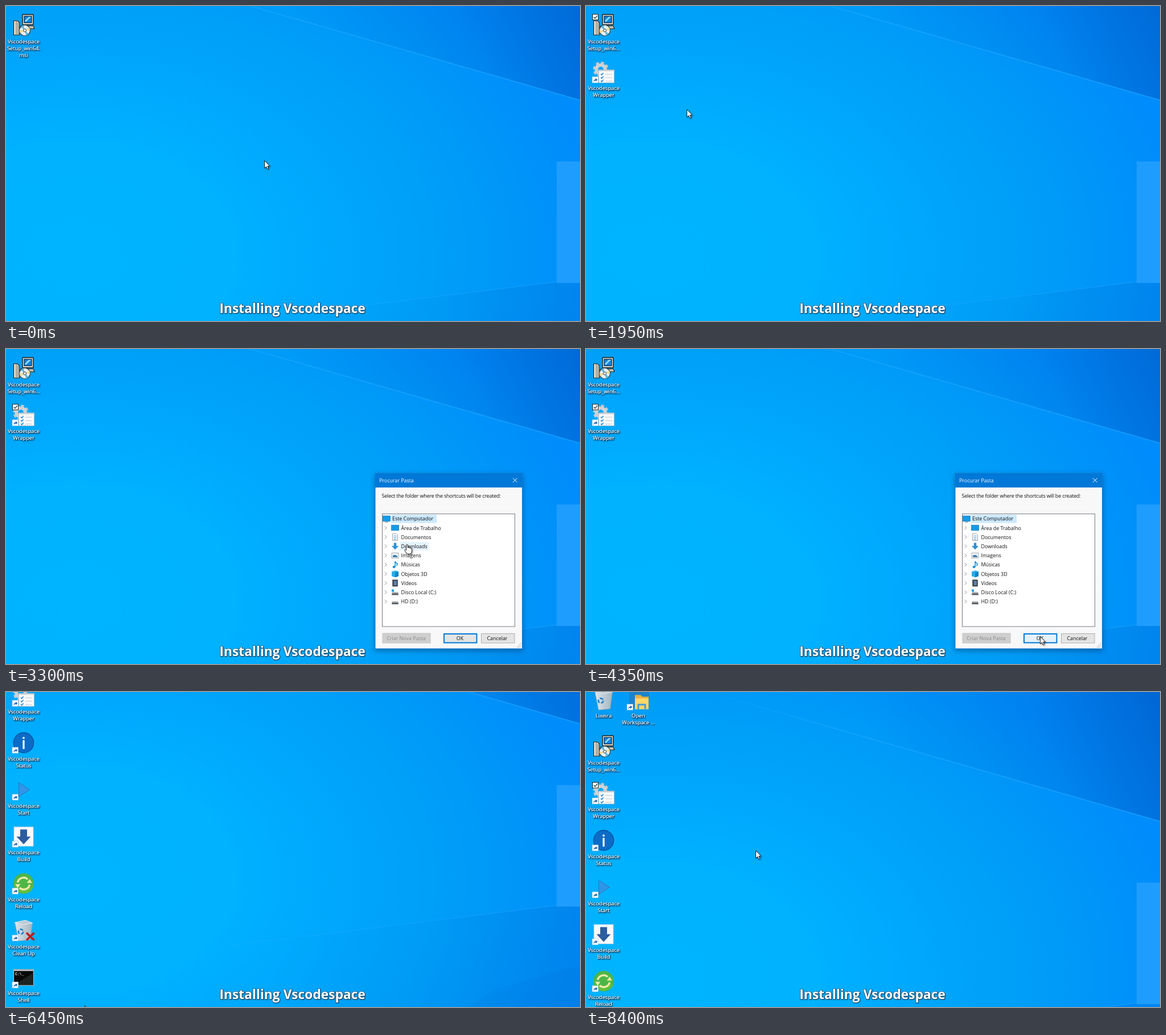
Animation of 1009x555 px, one loop 8550 ms. Source, as an HTML page:

```html
<!DOCTYPE html>
<html lang="en">
<head>
<meta charset="utf-8">
<title>Installing Vscodespace</title>
<style>
  html, body { margin: 0; width: 100%; height: 100%; overflow: hidden; background: #00a5fa; }
  svg { display: block; width: 1009px; height: 555px; }
  text { font-family: "Open Sans", "Noto Sans", sans-serif; }
  .label { font-size: 9.4px; fill: #fff; text-anchor: middle; filter: url(#labelShadow); }
  .caption { font-size: 22.8px; font-weight: 700; fill: #fff; text-anchor: middle;
    stroke: #2b5878; stroke-width: 1.6px; stroke-linejoin: round; paint-order: stroke; filter: url(#captionShadow); }
  #dialog text { font-size: 8.9px; fill: #111; }
  #dialog .mid { text-anchor: middle; }
  #dialog .light { fill: #fff; }
  #dialog .off { fill: #8b8b8b; }
  #dialog .prompt { font-size: 9px; letter-spacing: -.2px; }
</style>
</head>
<body>
<svg viewBox="0 0 1009 555" xmlns="http://www.w3.org/2000/svg">
  <defs>
    <radialGradient id="sky" gradientUnits="userSpaceOnUse" cx="0" cy="0" r="800"
        gradientTransform="translate(120 440) scale(1.4 1)">
      <stop offset="0" stop-color="#00b4ff"/>
      <stop offset=".25" stop-color="#00b2ff"/>
      <stop offset=".33" stop-color="#00acfe"/>
      <stop offset=".44" stop-color="#00a6fb"/>
      <stop offset=".55" stop-color="#00a0f8"/>
      <stop offset=".68" stop-color="#0097f8"/>
      <stop offset=".82" stop-color="#008dfb"/>
      <stop offset="1" stop-color="#008aff"/>
    </radialGradient>
    <linearGradient id="upper" gradientUnits="userSpaceOnUse" x1="560" y1="160" x2="1009" y2="-30">
      <stop offset="0" stop-color="#0050b8" stop-opacity="0"/>
      <stop offset=".55" stop-color="#0050b8" stop-opacity=".16"/>
      <stop offset="1" stop-color="#0050b8" stop-opacity=".58"/>
    </linearGradient>
    <linearGradient id="lower" gradientUnits="userSpaceOnUse" x1="480" y1="520" x2="1009" y2="660">
      <stop offset="0" stop-color="#0060c0" stop-opacity="0"/>
      <stop offset=".5" stop-color="#0060c0" stop-opacity=".06"/>
      <stop offset="1" stop-color="#0060c0" stop-opacity=".24"/>
    </linearGradient>
    <linearGradient id="beam" gradientUnits="userSpaceOnUse" x1="200" y1="0" x2="1009" y2="0">
      <stop offset="0" stop-color="#2bb4ff" stop-opacity="0"/>
      <stop offset=".4" stop-color="#22acff" stop-opacity=".55"/>
      <stop offset="1" stop-color="#1ba4ff" stop-opacity=".75"/>
    </linearGradient>
    <linearGradient id="bin" x1="0" y1="0" x2="1" y2="0">
      <stop offset="0" stop-color="#dfe6eb"/>
      <stop offset="1" stop-color="#a3b5c1"/>
    </linearGradient>
    <filter id="labelShadow" x="-20%" y="-30%" width="140%" height="180%">
      <feDropShadow dx=".6" dy=".8" stdDeviation=".5" flood-color="#001020"/>
      <feDropShadow dx=".4" dy=".6" stdDeviation="1" flood-color="#001020" flood-opacity=".8"/>
    </filter>
    <filter id="captionShadow" x="-10%" y="-30%" width="120%" height="180%">
      <feDropShadow dx=".6" dy=".8" stdDeviation=".7" flood-color="#00203c" flood-opacity=".7"/>
    </filter>
    <filter id="windowShadow" x="-10%" y="-10%" width="120%" height="120%">
      <feDropShadow dx="0" dy="3" stdDeviation="4" flood-color="#002c55" flood-opacity=".5"/>
    </filter>
    <filter id="pointerShadow" x="-30%" y="-30%" width="190%" height="180%">
      <feDropShadow dx="1.5" dy="1.5" stdDeviation="1" flood-opacity=".4"/>
    </filter>

    <g id="link">
      <rect x="-20" y="8" width="10.5" height="10.5" fill="#fff" stroke="#9fc3dc" stroke-width=".6"/>
      <path d="M-17.5 17C-17.5 13.5-16 12.5-14 12.5V10.3L-10.8 13.3L-14 16.2V14.3Q-16 14.2-17.5 17Z" fill="#1d62ad"/>
    </g>
    <g id="check">
      <rect x="-19.5" y="-19.5" width="10" height="10" fill="#fff" stroke="#222"/>
      <path d="M-17.3-14.5l2.2 2.4 4-5" fill="none" stroke="#222" stroke-width="1.2"/>
    </g>
    <g id="recycle" fill="none" stroke="#1880d0" stroke-width="2.6">
      <circle r="4.2" stroke-dasharray="6 2.8"/>
    </g>

    <g id="setup">
      <path d="M-17.5-8h6l4 3v22h-10z" fill="#e6e3d6" stroke="#24231f" stroke-width="1.2"/>
      <path d="M-13-7v23M-10-5v21" stroke="#6d6a5f" stroke-width="1.2"/>
      <rect x="-2" y="-19" width="19" height="18" rx="1" fill="#e4e1d3" stroke="#191815" stroke-width="1.4"/>
      <rect x="1" y="-16" width="13" height="11.5" fill="#1583dc" stroke="#0a2f57" stroke-width="1.3"/>
      <path d="M2-8l7-7h4l-9 9z" fill="#8fdcff"/>
      <path d="M-5 1h22l2 5H-7z" fill="#c9c5b6" stroke="#24231f" stroke-width="1.2"/>
      <circle cx="2" cy="9" r="9.5" fill="#e6eff3" stroke="#333d44" stroke-width="1.2"/>
      <path d="M2 9L-5 3a9 9 0 0 1 5-3zM2 9l7 6a9 9 0 0 1-5 3z" fill="#5fb9e0"/>
      <path d="M2 9l8-5a9 9 0 0 1 1 5zM2 9l-8 5a9 9 0 0 1-1-5z" fill="#f3d98e"/>
      <circle cx="2" cy="9" r="2.6" fill="#fff" stroke="#333d44"/>
    </g>
    <g id="wrapper">
      <circle cx="-5" cy="-5" r="11" fill="none" stroke="#c3c8cc" stroke-width="5.5" stroke-dasharray="5 3.64"/>
      <circle cx="-5" cy="-5" r="7.8" fill="none" stroke="#ced2d5" stroke-width="6"/>
      <rect x="-8.5" y="-4" width="27" height="22.5" fill="#f8f9fa" stroke="#a9b4bb" stroke-width=".8"/>
      <path d="M-8.5-3h27" stroke="#c9d0d5" stroke-width="2"/>
      <path d="M-5 3l1.6 1.6 3-3.4M-5 9l1.6 1.6 3-3.4M-5 15l1.6 1.6 3-3.4" fill="none" stroke="#2087d8" stroke-width="1.5"/>
      <path d="M3 3.5h12M3 9.5h12M3 15.5h12" stroke="#c3cad0"/>
    </g>
    <g id="status">
      <circle r="17.7" fill="#0b6cc8" stroke="#0a4c94" stroke-width="1.2"/>
      <circle cy="-8.5" r="1.9" fill="#fff"/>
      <path d="M0-4.5V11" stroke="#fff" stroke-width="3.2"/>
    </g>
    <g id="start"><path d="M-8.5-12.5V12.5L10.5 0Z" fill="#2f95e6" stroke="#2a78c2"/></g>
    <g id="build">
      <rect x="-17" y="-17" width="34" height="34" fill="#f7f9fc" stroke="#c4d5e4" stroke-width=".7"/>
      <path d="M-6-12.5H6V0H12.5L0 13.5L-12.5 0H-6Z" fill="#2c5d9f"/>
    </g>
    <g id="reload">
      <circle r="18" fill="#4db746"/>
      <path d="M-17 5A18 18 0 0 0 17 5Q0 12-17 5Z" fill="#62c03c"/>
      <path d="M-10.5-2A10.500 10.500 0 0 1 7-7.500M10.500 2A10.500 10.500 0 0 1-7 7.500" fill="none" stroke="#eee9a8" stroke-width="3.6"/>
      <path d="M5.500-1h9.500l-4.500-7zM-5.500 1h-9.500l4.500 7z" fill="#eee9a8"/>
    </g>
    <g id="trash">
      <path d="M-15.5-14L3-18 15.5-13 11.5 16.5-9 18.5Z" fill="url(#bin)" stroke="#7f9bac" stroke-width=".8"/>
      <path d="M-15.5-14L3-18 15.5-13 0-10.5Z" fill="#bccbd4" stroke="#eef3f6" stroke-width=".9"/>
      <path d="M0-10.5L2 17" stroke="#b4c4ce"/>
      <use href="#recycle" x="-5" y="2"/>
    </g>
    <g id="clean">
      <use href="#trash"/>
      <path d="M5 4L18.5 17M18.5 4L5 17" stroke="#c31c1c" stroke-width="3.6"/>
    </g>
    <g id="shell">
      <rect x="-17.5" y="-14" width="35" height="28" fill="#080808" stroke="#aeb5b9" stroke-width="1.3"/>
      <path d="M-16.8-12.4h33.6" stroke="#d9dde0" stroke-width="1.8"/>
      <path d="M-16.8 13.3L16.8-8V13.3Z" fill="#1d2422"/>
      <text x="-15" y="-4" font-size="6.5" fill="#eee" style="font-family:'Liberation Mono',monospace;font-weight:700">C:\_</text>
    </g>
    <g id="stop">
      <circle r="17.5" fill="#c4151b" stroke="#8f1116" stroke-width="1.2"/>
      <rect x="-8" y="-10" width="16" height="18" fill="#fff"/>
    </g>
    <g id="open">
      <rect x="-16" y="-17" width="35" height="32" fill="#1b83cc"/>
      <path d="M-6-8H4l3 3H18V17H-6Z" fill="#e9b13b"/>
      <path d="M-6-2H18V17H-6Z" fill="#ffd767"/>
      <path d="M0 17V9H12V17" fill="none" stroke="#4a9bd2" stroke-width="3"/>
    </g>
  </defs>

  <g id="world">
    <rect y="-90" width="1009" height="830" fill="url(#sky)"/>
    <path d="M116-90L1009 166V-90Z" fill="url(#upper)"/>
    <path d="M116-90L1009 166" stroke="url(#beam)" stroke-width="1.8"/>
    <path d="M400 556L968 486H1009V740H400Z" fill="url(#lower)"/>
    <path d="M860 634L1009 592V740H700Z" fill="#0060c0" opacity=".08"/>
    <path d="M400 556L968 486" stroke="url(#beam)" stroke-width="1.3" opacity=".7"/>
    <rect x="968" y="274" width="214" height="214" fill="#1f9dff"/>
    <g id="icons"></g>
  </g>

  <g id="dialog">
    <rect x="649" y="219" width="258.5" height="309" fill="#f8f8f8" stroke="#1b7fd0" filter="url(#windowShadow)"/>
    <rect x="649" y="219" width="258.5" height="25" fill="#0078d7"/>
    <text class="light" x="656" y="234.5">Procurar Pasta</text>
    <path d="M891 227.5l7.5 7.5m0-7.5l-7.5 7.5" stroke="#fff"/>
    <text class="prompt" x="660.5" y="261.5">Select the folder where the shortcuts will be created:</text>
    <rect x="661.5" y="290.5" width="233" height="198.5" fill="#fff" stroke="#777c84"/>
    <rect x="677" y="292" width="80" height="14.5" fill="#cce8ff"/>
    <rect id="hover" x="693" height="15" fill="#e5f3ff"/>
    <g id="tree"></g>
    <rect x="662" y="501" width="84" height="17" fill="#cfcfcf" stroke="#c2c2c2"/>
    <text class="mid off" x="703.5" y="513">Criar Nova Pasta</text>
    <rect id="ok" x="770" y="502" width="57.5" height="15.5" stroke="#0078d7" stroke-width="2"/>
    <text class="mid" x="798" y="513">OK</text>
    <rect x="835.5" y="501.5" width="58.5" height="16.5" fill="#e4e4e4" stroke="#adadad"/>
    <text class="mid" x="863.5" y="513">Cancelar</text>
    <path d="M898 525h7M901 522h4M903.5 519h1.5" stroke="#b0b0b0" stroke-width="1.7" stroke-dasharray="1.7 1.3"/>
  </g>

  <text class="caption" x="503.5" y="541">Installing Vscodespace</text>

  <g id="pointer" filter="url(#pointerShadow)">
    <path id="arrow" d="M.5.5V13.7L3.500 11 5.500 15.500 7.600 14.600 5.700 10.200H9.700Z" fill="#fff" stroke="#111" stroke-width=".9"/>
    <path id="hand" d="M-1.3 1.3Q0-.8 1.3 1.3V6Q3 4.800 4 6.500 5.500 5.500 6.300 7 8.500 6.500 8.500 9 8.800 14 6.500 17H-.5Q-2 13.500-4.500 10.500-4 8-1.300 10.500Z" fill="#fff" stroke="#111" stroke-width=".9"/>
  </g>
</svg>
<script>
const LOOP = 8550, STEP = 150, PITCH = 82.7;
const $ = id => document.getElementById(id);
const show = (el, on) => { el.style.display = on ? '' : 'none'; };

// name, column, row, label lines, time it appears, shortcut badge
const ITEMS = [
  ['trash', 0, -1, ['Lixeira'], 0, 0],
  ['setup', 0, 0, ['Vscodespace', 'Setup_win6...'], 0, 0],
  ['wrapper', 0, 1, ['Vscodespace', 'Wrapper'], 1650, 1],
  ['status', 0, 2, ['Vscodespace', 'Status'], 5100, 1],
  ['start', 0, 3, ['Vscodespace', 'Start'], 5400, 1],
  ['build', 0, 4, ['Vscodespace', 'Build'], 5550, 1],
  ['reload', 0, 5, ['Vscodespace', 'Reload'], 5700, 1],
  ['clean', 0, 6, ['Vscodespace', 'Clean Up'], 5850, 1],
  ['shell', 0, 7, ['Vscodespace', 'Shell'], 6000, 1],
  ['stop', 0, 8, [], 6150, 1],
  ['open', 1, -1, ['Open', 'Workspace ...'], 6300, 1]
];

const lines = (list, id) => `<g class="label" id="${id}">` +
  list.map((s, i) => `<text y="${31.5 + 12 * i}">${s}</text>`).join('') + '</g>';

$('icons').innerHTML = ITEMS.map(([name, col, row, label, , badge]) =>
  `<g id="item-${name}" transform="translate(${31 + 61 * col} ${34 + PITCH * row})">` +
  `<use href="#${name}"/>${badge ? '<use href="#link"/>' : ''}${lines(label, 'label-' + name)}` +
  (name === 'setup' ? lines(['Vscodespace', 'Setup_win64.', 'msi'], 'label-full') : '') +
  `<use href="#check" id="check-${name}"/></g>`).join('');

const FOLDERS = ['Este Computador', 'Área de Trabalho', 'Documentos', 'Downloads', 'Imagens',
  'Músicas', 'Objetos 3D', 'Vídeos', 'Disco Local (C:)', 'HD (D:)'];
const screenIcon = '<rect x="-6.5" y="-5" width="13" height="9.5" fill="#159be8" stroke="#1473ad" stroke-width=".7"/>';
const drive = '<path d="M-5 0H5L6 5H-6Z" fill="#555b60"/><path d="M-5 0H5L6 2H-6Z" fill="#b9bec2"/>';
const GLYPHS = [
  screenIcon + '<path d="M-3 6H3" stroke="#55707f"/>',
  screenIcon,
  '<path d="M-4.5-6H2L4.5-3.5V6H-4.5Z" fill="#fff" stroke="#7f8b94" stroke-width=".8"/><path d="M-2.5-2H2.5M-2.5 1H2.5M-2.5 4H2.5" stroke="#3b93cc"/>',
  '<path d="M-2.2-6H2.2V-.5H6L0 6-6-.5H-2.2Z" fill="#2d8fd8"/>',
  '<rect x="-6" y="-4.5" width="12" height="9" fill="#f4f7f9" stroke="#88949c" stroke-width=".8"/><path d="M-4 3V0L0-1 4 1V3Z" fill="#3276a8"/>',
  '<path d="M0-6V4M0-6Q1-3 4-1.5Q3.5 1 2.5 2" fill="none" stroke="#118fdd" stroke-width="1.6"/><ellipse cx="-2" cy="4" rx="2.5" ry="2" fill="#118fdd"/>',
  '<path d="M-6-4L1-6 6-4V4L0 6-6 4Z" fill="#27aee8"/><path d="M-6-4L0-2 6-4V4L0 6V-2Z" fill="#1384c4"/>',
  '<rect x="-5" y="-6" width="10" height="12" fill="#333b43"/><path d="M-4-6V6M4-6V6" stroke="#c7ced3" stroke-dasharray="1.3 1.3"/><rect x="-2" y="-4" width="4.5" height="8" fill="#5f88b4"/>',
  drive + '<rect x="-6" y="-5" width="4" height="4" fill="#1a9be8"/>',
  drive
];
$('tree').innerHTML = FOLDERS.map((name, i) => {
  const y = 299 + 16.2 * i;
  return `<g transform="translate(${i ? 684 : 669} ${y})">${GLYPHS[i]}</g>` +
    (i ? `<path d="M666 ${y - 3}l3 3-3 3" fill="none" stroke="#888"/>` : '') +
    `<text x="${i ? 694.5 : 679}" y="${y + 3.3}">${name}</text>`;
}).join('');

// time, x, y
const POINTER = [
  [0, 454, 272], [150, 420, 250], [300, 290, 165], [450, 120, 75], [600, 38, 38], [1350, 38, 38],
  [1650, 115, 115], [1950, 177, 182], [2100, 110, 150], [2250, 40, 120], [2850, 40, 120],
  [3000, 270, 200], [3150, 552, 293], [3300, 705, 344], [3600, 716, 395], [3900, 780, 480],
  [4050, 798, 506], [4500, 798, 506], [4950, 820, 440], [5250, 824, 421], [5550, 680, 440],
  [6000, 290, 505], [6450, 138, 552], [6750, 135, 575], [7500, 140, 575], [7950, 220, 430], [8400, 298, 279]
];
// time, vertical shift of the desktop
const PAN = [[0, 0], [5250, 0], [5550, -14], [6000, -68], [6450, -110], [6750, -124],
  [7350, -134.4], [7650, -100], [8100, 15], [8400, 62]];

function at(keys, t) {
  const i = keys.findIndex(k => k[0] > t);
  if (i < 0) return keys[keys.length - 1].slice(1);
  const a = keys[i - 1], b = keys[i], f = (t - a[0]) / (b[0] - a[0]);
  return a.slice(1).map((v, n) => v + (b[n + 1] - v) * f);
}

function draw(t) {
  const [x, y] = at(POINTER, t);
  const [pan] = at(PAN, t);
  $('world').setAttribute('transform', `translate(0 ${pan})`);
  $('pointer').setAttribute('transform', `translate(${x} ${y})`);

  const within = (a, b) => t >= a && t < b;
  for (const [name, , , , from] of ITEMS) {
    show($('item-' + name), t >= from);
    show($('check-' + name), name === 'setup' ? within(600, 2250) : name === 'wrapper' && t >= 2250);
  }
  show($('label-full'), t < 900);
  show($('label-setup'), t >= 900);

  const open = within(2700, 4500);
  const row = Math.floor((y - 291) / 16.2);
  const onTree = open && x > 662 && x < 894 && row > 0 && row < FOLDERS.length;
  show($('dialog'), open);
  show($('hover'), onTree);
  if (onTree) {
    $('hover').setAttribute('y', 291.5 + 16.2 * row);
    $('hover').setAttribute('width', $('tree').querySelectorAll('text')[row].getComputedTextLength() + 4);
  }
  show($('hand'), onTree);
  show($('arrow'), !onTree);
  $('ok').setAttribute('fill', open && y > 501 ? '#e5f1fb' : '#e4e4e4');
}

function tick(now) {
  draw(Math.floor(now % LOOP / STEP) * STEP);
  requestAnimationFrame(tick);
}
draw(0);
requestAnimationFrame(tick);
</script>
</body>
</html>
```
